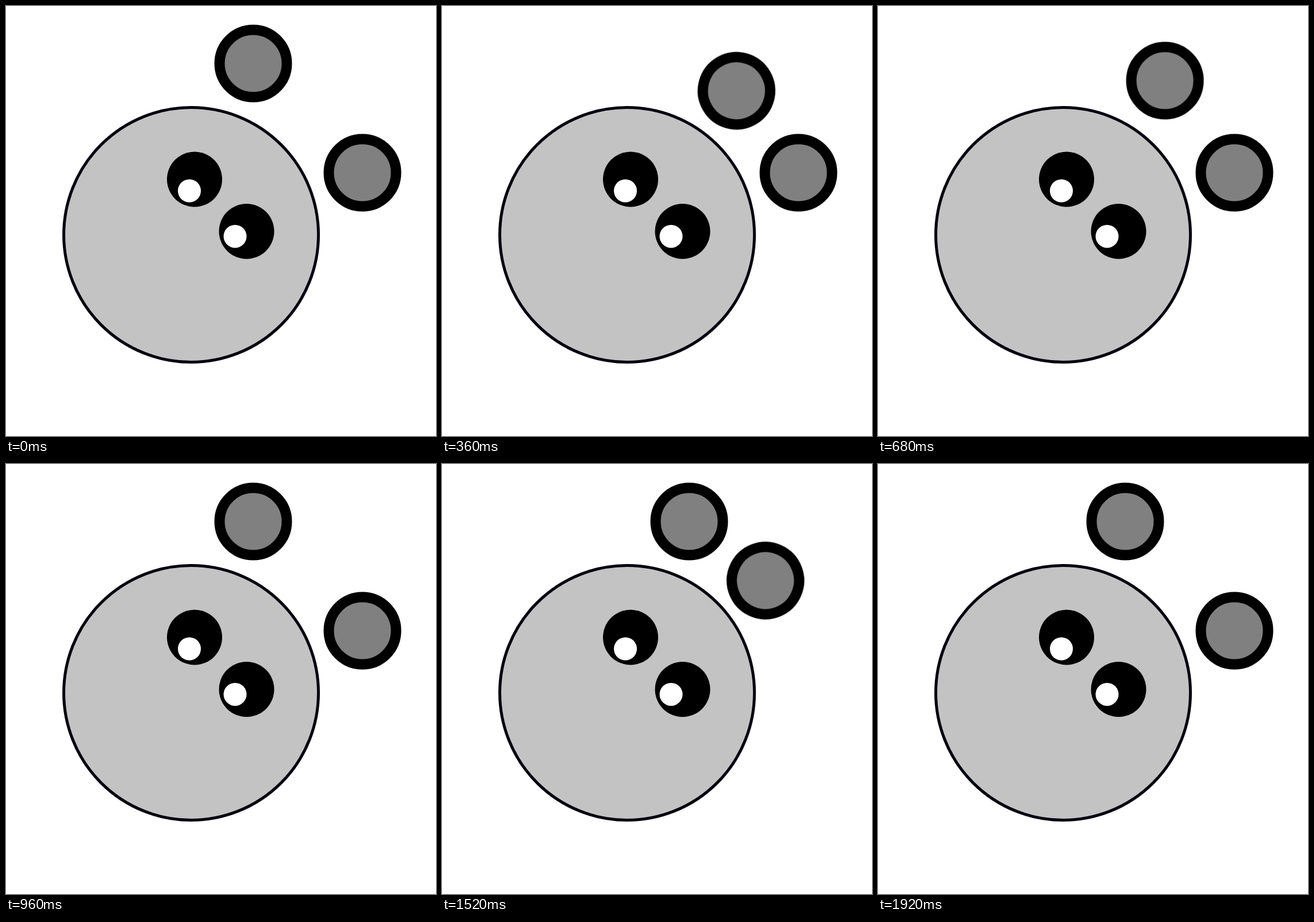
Animation, 748 px wide and 748 px high, one loop 1.96 s. Source, as an HTML page:

```html
<!DOCTYPE html>
<html lang="en">
<head>
<meta charset="utf-8">
<title>Swinging balls</title>
<style>
  html, body {
    margin: 0;
    width: 100%;
    height: 100%;
    overflow: hidden;
    background: #fff;
  }
  svg { display: block; width: 100vw; height: 100vh; }

  .head { fill: #c3c3c3; stroke: #00000f; stroke-width: 5; }
  .shine { fill: #fff; }
  .ball {
    fill: #808080;
    stroke: #000;
    stroke-width: 18;
    animation: 1960ms steps(12) infinite;
  }

  /* Each ball swings 80 degrees along its own arc and back, one after the other. */
  .upper { transform-origin: 430px 195px; animation-name: swing-upper; }
  .lower { transform-origin: 525px 290px; animation-name: swing-lower; }

  @keyframes swing-upper {
    0% { transform: rotate(0deg); }
    24.4898% { transform: rotate(80deg); }
    48.9796%, 100% { transform: rotate(0deg); }
  }
  @keyframes swing-lower {
    0%, 48.9796% { transform: rotate(0deg); }
    73.4694% { transform: rotate(-80deg); }
    97.9592%, 100% { transform: rotate(0deg); }
  }
</style>
</head>
<body>
<svg viewBox="0 0 748 748">
  <circle class="head" cx="322" cy="398" r="221.5"/>
  <circle cx="328" cy="301.5" r="48"/>
  <circle cx="418.5" cy="392" r="48"/>
  <circle class="shine" cx="319" cy="321.5" r="20"/>
  <circle class="shine" cx="398.5" cy="400.7" r="20"/>
  <circle class="ball upper" cx="430" cy="100" r="58.5"/>
  <circle class="ball lower" cx="620" cy="290" r="58.5"/>
</svg>
</body>
</html>
```
